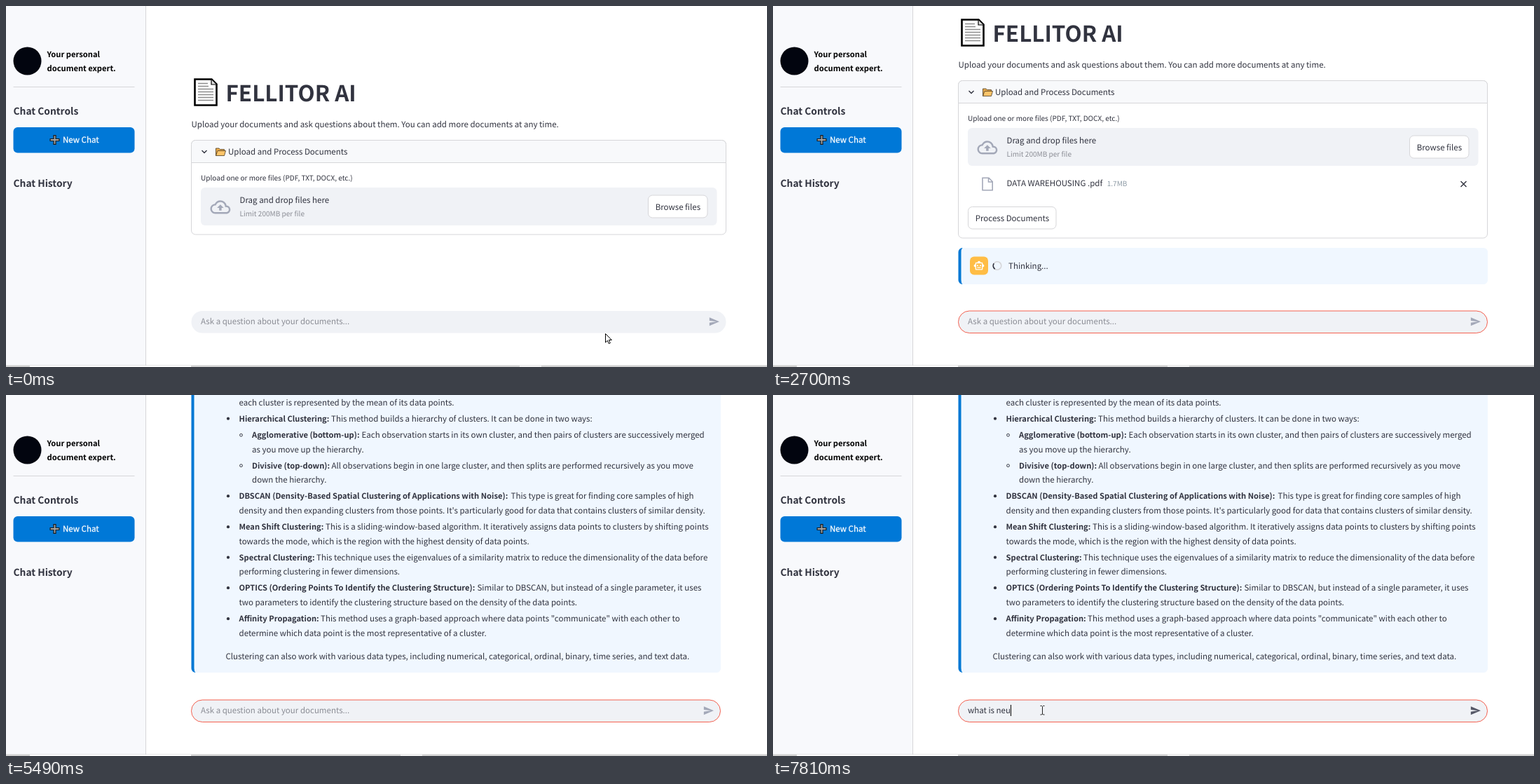
Animation of 1086 by 515 pixels, one loop 8000 ms. Source, as an HTML page:

```html
<!DOCTYPE html>
<html lang="en">
<head>
<meta charset="utf-8">
<title>Document chat</title>
<style>
  html, body { margin: 0; width: 100%; height: 100%; overflow: hidden; background: #fff; }
  svg { display: block; width: 1086px; height: 515px; }
  text {
    font: 11.52px "Noto Sans CJK JP", "Noto Sans CJK SC", "Noto Sans CJK", "Open Sans", sans-serif;
    fill: #31333f; white-space: pre; text-rendering: geometricPrecision;
  }
  .small { font-size: 10.06px; }
  .muted { fill: #8b8d95; }
  .bold { font-weight: 700; font-size: 11.16px; }
  .dark { fill: #000; }
  .head { font-weight: 700; font-size: 13.8px; }
  .title { font-weight: 700; font-size: 31.4px; }
  .light { fill: #fff; stroke: #fff; stroke-width: .25px; }
  .line { stroke: #d6d6d9; }
  .box { fill: #fff; stroke: #d6d6d9; }
  .pale { fill: #f0f2f6; }
  .icon { fill: #a3a8b8; }
  .msg { fill: #f0f7ff; }
  .bar { fill: #0078d4; }
  .off { display: none; }
</style>
</head>
<body>
<svg viewBox="0 0 1086 515">
  <defs>
    <clipPath id="view"><rect x="200" width="886" height="422"/></clipPath>
    <g id="user">
      <rect x="-13" y="-13" width="26" height="26" rx="6" fill="#ff6c6c"/>
      <g fill="none" stroke="#fff" stroke-width="1.4">
        <circle r="6"/>
        <path d="M-5.6 -1.2Q-2.4 -1.8 -1.2 -5Q1.2 -1.6 5.7 -1.6"/>
      </g>
      <path d="M-2.2 .2a.9 .9 0 1 0 .01 0M2.2 .2a.9 .9 0 1 0 .01 0" fill="#fff"/>
    </g>
    <g id="bot">
      <rect x="-13" y="-13" width="26" height="26" rx="6" fill="#ffbd45"/>
      <path transform="scale(.67) translate(-12 -12)" fill="#fff" d="M20 9V7c0-1.1-.9-2-2-2h-3c0-1.66-1.34-3-3-3S9 3.34 9 5H6c-1.1 0-2 .9-2 2v2c-1.66 0-3 1.34-3 3s1.34 3 3 3v4c0 1.1.9 2 2 2h12c1.1 0 2-.9 2-2v-4c1.66 0 3-1.34 3-3s-1.34-3-3-3zm-2 10H6V7h12zm-9-6a1.5 1.5 0 1 1 .01 0zm6 0a1.5 1.5 0 1 1 .01 0zM8 15h8v2H8z"/>
    </g>
    <g id="ring" fill="none" stroke-width="1.6">
      <circle r="5.8" stroke="#d6d6d9"/>
      <path d="M-4.1 -4.1A5.8 5.8 0 0 1 4.1 -4.1" stroke="#31333f"/>
    </g>
  </defs>

  <g id="side">
    <rect width="200" height="515" fill="#f8f9fc"/>
    <path class="line" d="M199.5 0V515M10.5 115.5H183.5"/>
    <circle cx="30.5" cy="78.5" r="20" fill="#02050f"/>
    <text x="58.5" y="72.5" class="bold dark">Your personal</text>
    <text x="58.5" y="93" class="bold dark">document expert.</text>
    <text x="10.5" y="155" class="head">Chat Controls</text>
    <rect x="10.5" y="173" width="173" height="36.5" rx="6" fill="#0078d7"/>
    <path d="M69.5 184V198M62.5 191H76.5" stroke="#1c1c1c" stroke-width="4.2"/>
    <path d="M69.5 185.2V196.8M63.7 191H75.3" stroke="#a5a5a5" stroke-width="1.8"/>
    <text x="81" y="195.3" class="light">New Chat</text>
    <text x="10.5" y="258" class="head">Chat History</text>
  </g>

  <g clip-path="url(#view)">
    <g id="page">
      <path d="M269.5 19.5H293.5L300.5 26.5V56.5H269.5Z" fill="#fff" stroke="#000" stroke-width="2.6"/>
      <path d="M293 20V27H300" fill="#ddd" stroke="#000" stroke-width="1.2"/>
      <path d="M274 25.5H288M274 29.5H289M274 33.5H296M274 37.5H296M274 41.5H296M274 45.5H296M274 49.5H296" stroke="#8c8c8c" stroke-width="1.5"/>
      <text x="313.5" y="51" class="title">FELLITOR AI</text>
      <text x="264.5" y="87.5">Upload your documents and ask questions about them. You can add more documents at any time.</text>

      <rect id="panel" class="box" x="264.5" y="106.5" rx="6"/>
      <path id="cap" fill="#f8f9fb" class="line"/>
      <path d="M279.5 121L283 124.5L286.5 121" fill="none" stroke="#31333f" stroke-width="1.4"/>
      <g stroke="#4a3a22" stroke-width=".8" stroke-linejoin="round">
        <path d="M299.5 128.5V118H304L305.5 119.5H311.5V122" fill="#e8a94a"/>
        <path d="M299.5 128.5L302 121.5H313.5L311.5 128.5Z" fill="#ffc469"/>
      </g>
      <text x="317" y="126.8">Upload and Process Documents</text>
      <text x="278" y="163.8" class="small">Upload one or more files (PDF, TXT, DOCX, etc.)</text>
      <rect id="drop" class="pale" x="278" y="174" height="54" rx="6"/>
      <path class="icon" transform="translate(291.5 187.5) scale(1.2)" d="M19.35 10.04A7.49 7.49 0 0 0 12 4C9.11 4 6.6 5.64 5.35 8.04A6 6 0 0 0 0 14c0 3.31 2.69 6 6 6h13c2.76 0 5-2.24 5-5 0-2.64-2.05-4.78-4.65-4.96zM19 18H6c-2.21 0-4-1.79-4-4 0-2.05 1.53-3.76 3.56-3.97l1.07-.11.5-.95A5.47 5.47 0 0 1 12 6c2.62 0 4.88 1.86 5.39 4.43l.3 1.5 1.53.11A2.98 2.98 0 0 1 22 15c0 1.65-1.35 3-3 3zM8 13h2.55v3h2.9v-3H16l-4-4z"/>
      <text x="333.5" y="196">Drag and drop files here</text>
      <text x="333.5" y="214.5" class="small muted">Limit 200MB per file</text>
      <g id="browse">
        <rect class="box" x="908.5" y="185" width="84.5" height="32" rx="6"/>
        <text x="918.7" y="205.5">Browse files</text>
      </g>

      <g id="file">
        <path d="M299 245.3H308L313.2 250.5V262.7H299ZM307.5 245.5V251H313" fill="none" stroke="#a3a8b8" stroke-width="1.6"/>
        <text x="333.5" y="256.5">DATA WAREHOUSING .pdf</text>
        <text x="476.7" y="256.5" class="small" style="fill:#8d9aa5">1.7MB</text>
        <path d="M981.5 250L989.5 258M989.5 250L981.5 258" stroke="#31333f" stroke-width="1.4"/>
        <rect class="box" x="278.5" y="286.5" width="125.5" height="31.5" rx="6"/>
        <text x="288.7" y="307">Process Documents</text>
      </g>

      <g id="busy">
        <g transform="translate(285 342)"><use href="#ring" class="spin"/></g>
        <text x="301" y="346">Processing documents... This may take a moment.</text>
      </g>
      <g id="info">
        <rect x="278" y="365.5" width="728.5" height="44.5" rx="6" fill="#e8f0fc"/>
        <text x="291" y="392" style="fill:#004280">Creating a new knowledge base for this chat...</text>
      </g>

      <g id="think">
        <use href="#bot" x="294" y="370.5"/>
        <g transform="translate(320 370.5)"><use href="#ring" class="spin"/></g>
        <text x="336" y="375">Thinking...</text>
      </g>
      <g id="stale">
        <use href="#user" x="294" y="370.5"/>
        <text x="313.5" y="372">what is clustering?</text>
      </g>
      <g id="chat">
        <use href="#user" x="294" y="370.5"/>
        <text x="313.5" y="375">what is clustering?</text>
        <use href="#bot" x="294" y="447.5"/>
      </g>
    </g>
  </g>

  <g id="ask">
    <rect id="field" class="pale" x="264.5" y="435" height="31.5" rx="15.75"/>
    <text id="typed" x="278" y="454"></text>
    <path id="caret" d="M0 442V458" stroke="#000"/>
    <path id="send" d="M2.01 21L23 12 2.01 3 2 10l15 2-15 2z"/>
  </g>

  <rect y="512.5" width="1086" height="2.5" fill="#d0d0d0"/>
  <rect x="34" y="513" width="230" height="2" fill="#fff"/>
  <rect id="task" y="512.5" width="31" height="2.5" fill="#f0f0f0"/>

  <path id="arrow" d="M.5 .5V13L3.4 10.3L5.3 14.7L7.3 13.8L5.4 9.5H9.3Z" fill="#fff" stroke="#000"/>
  <path id="beam" d="M381.5 443.5H383.5L384.5 444.5L385.5 443.5H387.5M384.5 444.5V455M381.5 456H383.5L384.5 455L385.5 456H387.5" fill="none" stroke="#222"/>
</svg>

<script>
const LOOP = 8000, END = -563.5, HINT = 'Ask a question about your documents...';
const $ = id => document.getElementById(id);

function add(parent, tag, attrs, text = '') {
  const el = document.createElementNS('http://www.w3.org/2000/svg', tag);
  for (const k in attrs) el.setAttribute(k, attrs[k]);
  el.textContent = text;
  return parent.appendChild(el);
}
const set = (id, attrs) => { for (const k in attrs) $(id).setAttribute(k, attrs[k]); };
const show = (id, on) => $(id).classList.toggle('off', !on);

function message(id, top, height) {
  const g = $(id), first = g.firstChild, end = top + height;
  const put = (tag, attrs) => g.insertBefore(add(g, tag, attrs), first);
  put('rect', { class: 'msg', x: 264.5, y: top, width: 755.5, height, rx: 6 });
  put('path', { class: 'bar', d: `M270.5 ${top}A6 6 0 0 0 264.5 ${top + 6}V${end - 6}A6 6 0 0 0 270.5 ${end}Q268.5 ${end - 2} 268.5 ${end - 6}V${top + 6}Q268.5 ${top + 2} 270.5 ${top}Z` });
}
message('think', 345, 52);
message('stale', 345, 200);
message('chat', 345, 52);
message('chat', 422, 537.5);

// x, baseline, text, and for list items: bold lead, x after the lead
const intro = [
  'Clustering is a fascinating method of unsupervised learning! It involves taking a set of objects and grouping them together in such',
  'a way that the objects within the same group, which we call a "cluster," are more similar to each other than they are to objects in'
];
const reply = [
  [313.5, 449, intro[0]],
  [313.5, 470, intro[1]],
  [313.5, 490.5, "other groups or clusters. It's a really common and useful technique for statistical data analysis across many different fields."],
  [313.5, 523.5, 'There are several common types of clustering methods, each with its own approach:'],
  [332.5, 557.5, "Here, 'K' represents the number of clusters you want. The algorithm divides the data into K clusters, and", 'K-Means Clustering:', 443.5],
  [332.5, 578, 'each cluster is represented by the mean of its data points.'],
  [332.5, 601, 'This method builds a hierarchy of clusters. It can be done in two ways:', 'Hierarchical Clustering:', 464],
  [351, 624.5, 'Each observation starts in its own cluster, and then pairs of clusters are successively merged', 'Agglomerative (bottom-up):', 507.5],
  [351, 645, 'as you move up the hierarchy.'],
  [351, 668, 'All observations begin in one large cluster, and then splits are performed recursively as you move', 'Divisive (top-down):', 464.5],
  [351, 688.5, 'down the hierarchy.'],
  [332.5, 711.5, 'This type is great for finding core samples of high', 'DBSCAN (Density-Based Spatial Clustering of Applications with Noise):', 720.5],
  [332.5, 732, "density and then expanding clusters from those points. It's particularly good for data that contains clusters of similar density."],
  [332.5, 755.5, 'This is a sliding-window-based algorithm. It iteratively assigns data points to clusters by shifting points', 'Mean Shift Clustering:', 456],
  [332.5, 776, 'towards the mode, which is the region with the highest density of data points.'],
  [332.5, 799, 'This technique uses the eigenvalues of a similarity matrix to reduce the dimensionality of the data before', 'Spectral Clustering:', 443],
  [332.5, 819.5, 'performing clustering in fewer dimensions.'],
  [332.5, 842.5, 'Similar to DBSCAN, but instead of a single parameter, it uses', 'OPTICS (Ordering Points To Identify the Clustering Structure):', 672.5],
  [332.5, 863, 'two parameters to identify the clustering structure based on the density of the data points.'],
  [332.5, 886.5, 'This method uses a graph-based approach where data points "communicate" with each other to', 'Affinity Propagation:', 449],
  [332.5, 907, 'determine which data point is the most representative of a cluster.'],
  [313.5, 940, 'Clustering can also work with various data types, including numerical, categorical, ordinal, binary, time series, and text data.']
];
for (const [x, y, text, lead, after] of reply) {
  add($('chat'), 'text', { x: after || x, y }, text);
  if (!lead) continue;
  add($('chat'), 'text', { x, y, class: 'bold' }, lead);
  const inner = x > 340;
  add($('chat'), 'circle', { cx: x - 15.5, cy: y - 3.8, r: inner ? 1.9 : 2.1, fill: inner ? 'none' : '#31333f', stroke: inner ? '#31333f' : 'none' });
}
intro.forEach((s, i) => add($('stale'), 'text', { x: 313.5, y: 406 + i * 20.5 }, s));

// Last value whose start time has passed
const at = (t, steps) => steps.reduce((v, s) => t >= s[0] ? s[1] : v, null);
const SCROLL = [[0, 85], [270, 77], [690, 42.5], [1020, -15], [1510, 77], [1720, 0],
  [5220, END], [5620, END + 48], [5890, END + 130], [6090, END + 235], [6220, -274], [6480, END]];
const BOTTOM = [[0, 241], [270, 331], [690, 365.5], [1020, 423.5], [1510, 331]];
const TYPED = [[0, ''], [1580, 'what is clu'], [1650, 'what is clustering?'], [1720, ''],
  [7010, 'w'], [7070, 'wha'], [7140, 'what'], [7400, 'what is n'], [7540, 'what is ne'], [7810, 'what is neu']];
const POINTER = [[0, [855, 467]], [70, [361, 298]], [350, [357, 340]], [440, [352, 378]],
  [760, null], [5620, [877, 374]], [6480, null]];

function scrollAt(t) {
  if (t < 4520 || t >= 5220) return at(t, SCROLL);
  const u = (t - 4520) / 700;
  return END * u * u * (3 - 2 * u);
}

function render(now) {
  const t = now >= 1090 && now < 5290 ? now - (now - 1090) % 70 : now;
  const extra = t < 270 ? 8 : 0, bottom = at(t, BOTTOM), right = 1019.5 + extra;
  set('page', { transform: `translate(0 ${scrollAt(t)})` });
  set('panel', { width: 755 + extra, height: bottom - 106.5 });
  set('cap', { d: `M264.5 138.5V112.5A6 6 0 0 1 270.5 106.5H${right - 6}A6 6 0 0 1 ${right} 112.5V138.5Z` });
  set('drop', { width: 728.5 + extra });
  set('browse', { transform: `translate(${extra} 0)` });

  show('file', t >= 270);
  show('busy', t >= 690 && t < 1510);
  show('info', t >= 1020 && t < 1510);
  show('think', t >= 1720 && t < 3960);
  show('stale', t >= 3960 && t < 4520);
  show('chat', t >= 4520);
  const turn = 50 + (t - 1370) * 360 / 840;
  document.querySelectorAll('.spin').forEach(el => el.setAttribute('transform', `rotate(${turn})`));

  const focus = t >= 1580 && t < 5620 || t >= 6480;
  const typed = at(t, TYPED), label = $('typed');
  set('ask', { opacity: t >= 690 && t < 1510 ? .35 : 1 });
  set('field', { width: 755 + extra, stroke: focus ? '#f4604f' : 'none' });
  label.textContent = typed || HINT;
  label.classList.toggle('muted', !typed);
  set('send', { transform: `translate(${994.5 + extra} 442.3) scale(.67)`, fill: typed ? '#555867' : '#a3a8b8' });
  show('caret', focus && (t >= 6480 || typed || (t + 20) % 1000 < 500));
  set('caret', { transform: `translate(${278.5 + (typed ? label.getComputedTextLength() : 0)} 0)` });

  set('task', { x: t < 70 ? 733 : 563 });
  const tip = at(t, POINTER);
  show('arrow', tip);
  if (tip) set('arrow', { transform: `translate(${tip})` });
  show('beam', t >= 6480);
}

const start = performance.now();
function tick() {
  render((performance.now() - start) % LOOP);
  requestAnimationFrame(tick);
}
tick();
</script>
</body>
</html>
```
